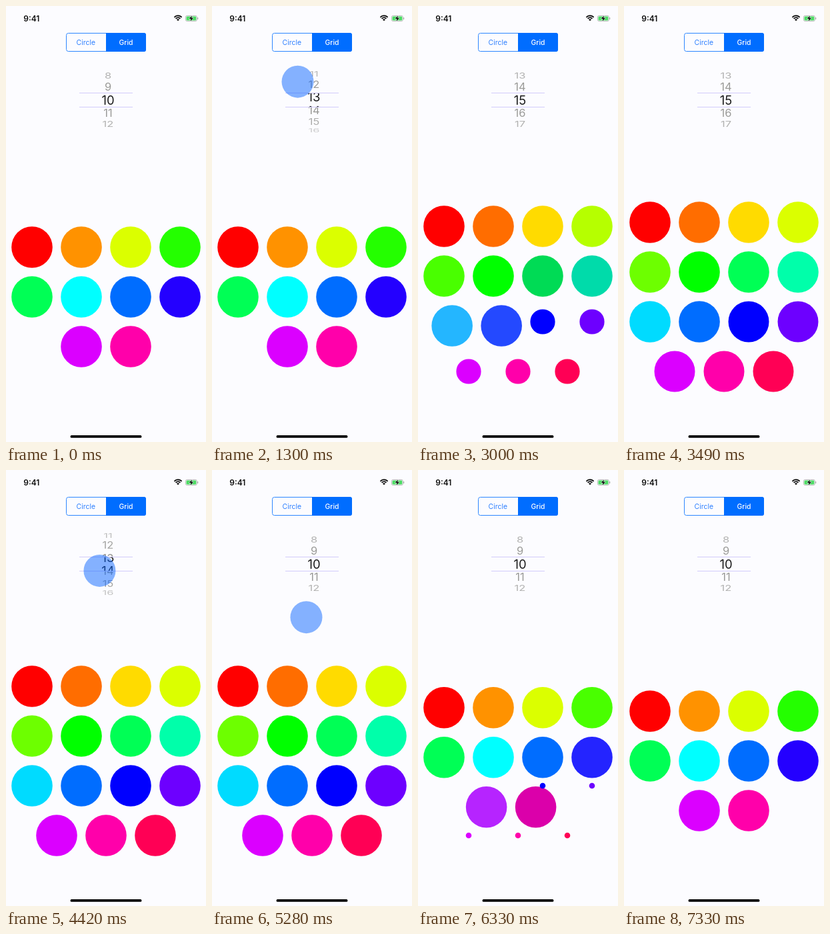
Write an HTML page with a canvas that moves like this. It is 300 by 649 pixels and loops after 7.47 s.

```html
<!DOCTYPE html>
<html lang="en">
<head>
<meta charset="utf-8">
<title>Colour grid picker</title>
<style>
html, body { margin: 0; width: 100%; height: 100%; overflow: hidden; background: #fcfcff; }
canvas { display: block; width: 300px; height: 649px; }
</style>
</head>
<body>
<canvas id="stage"></canvas>
<script>
const LOOP = 7470, BLUE = '#006dff', BG = '#fcfcff';
const FONT = 'Inter, Roboto, sans-serif';
const canvas = document.getElementById('stage');
const g = canvas.getContext('2d');
const dpr = window.devicePixelRatio || 1;
canvas.width = 300 * dpr;
canvas.height = 649 * dpr;
g.scale(dpr, dpr);

const clamp = x => Math.max(0, Math.min(1, x));
const lerp = (a, b, p) => a + (b - a) * p;
const easeOut = p => 1 - (1 - p) ** 2;
const smooth = p => p * p * (3 - 2 * p);
const spring = (rate, ms) => {
  const x = Math.max(0, ms) / 1000 * rate;
  return 1 - (1 + x) * Math.exp(-x);
};

function disc(x, y, r, fill) {
  g.fillStyle = fill;
  g.beginPath();
  g.arc(x, y, r, 0, Math.PI * 2);
  g.fill();
}

function box(x, y, w, h, r, fill) {
  g.fillStyle = fill;
  g.beginPath();
  g.roundRect(x, y, w, h, r);
  g.fill();
}

function label(text, x, y, font, fill) {
  g.font = font + ' ' + FONT;
  g.fillStyle = fill;
  g.textAlign = 'center';
  g.textBaseline = 'alphabetic';
  g.fillText(text, x, y);
}

// Two drags of the wheel; each one settles on a whole number after release.
const drags = [
  { down: 680, start: 740, end: 2206, up: 2260, from: 10, to: 15.2, rest: 15,
    ease: easeOut, y: 177, x: [131, 127] },
  { down: 3780, start: 3840, end: 5440, up: 5460, from: 15, to: 9.85, rest: 10,
    ease: smooth, y: 119, x: [140, 141.5] }
];
const GROW = 2784, SHRINK = 5963;

function wheelValue(t) {
  const d = t < drags[1].start ? drags[0] : drags[1];
  const v = lerp(d.from, d.to, d.ease(clamp((t - d.start) / (d.end - d.start))));
  return lerp(v, d.rest, smooth(clamp((t - d.up) / 400)));
}

function drawTouch(t) {
  for (const d of drags) {
    const alpha = clamp((t - d.down) / 100) * clamp(1 - (t - d.up) / 150);
    if (!alpha) continue;
    const p = d.ease(clamp((t - d.start) / (d.end - d.start)));
    const y = d.y - 20 * (d.to - d.from) * p;
    disc(lerp(...d.x, p), y, 24, `rgba(15,105,255,${0.5 * alpha})`);
  }
}

function drawStatus() {
  label('9:41', 38.3, 22.5, '600 12px', '#111');
  g.strokeStyle = '#000';
  g.lineWidth = 1.7;
  for (const r of [4.6, 7.6]) {
    g.beginPath();
    g.arc(258, 22, r, -Math.PI * 0.76, -Math.PI * 0.24);
    g.stroke();
  }
  g.fillStyle = '#000';
  g.beginPath();
  g.moveTo(258, 22.3);
  g.arc(258, 22, 2.6, -Math.PI * 0.76, -Math.PI * 0.24);
  g.fill();

  g.strokeStyle = '#aaa';
  g.lineWidth = 0.8;
  g.beginPath();
  g.roundRect(269.4, 14.4, 17, 8.2, 2.2);
  g.stroke();
  box(270.5, 15.5, 14.8, 6, 1.2, '#4cdb64');
  box(287.2, 17, 1.1, 3, 0.5, '#aaa');
  g.beginPath();
  [[279, 14.2], [274.6, 19.1], [277.3, 19.1], [276.6, 22.8], [281.2, 17.8], [278.3, 17.8]]
    .forEach(p => g.lineTo(...p));
  g.closePath();
  g.strokeStyle = BG;
  g.lineWidth = 1;
  g.stroke();
  g.fillStyle = '#111';
  g.fill();
}

function drawTabs() {
  g.strokeStyle = '#2f88ff';
  g.lineWidth = 1;
  g.beginPath();
  g.roundRect(90.5, 40.5, 119, 27, 3);
  g.stroke();
  box(150, 40, 60, 28, [0, 3, 3, 0], BLUE);
  label('Circle', 119.8, 57.7, '400 10.4px', '#2f80ff');
  label('Grid', 180, 57.7, '500 10.4px', '#fff');
}

// One pass over the cylinder of numbers, limited to the given strip.
function drawNumbers(v, top, height, size, ink) {
  const step = 22.6 * Math.PI / 180, mid = Math.round(v);
  g.save();
  g.beginPath();
  g.rect(105, top, 90, height);
  g.clip();
  for (let n = mid - 3; n <= mid + 3; n++) {
    const a = (n - v) * step;
    if (Math.abs(a) > 1.15) continue;
    g.save();
    g.translate(153, 139.8 + 50.7 * Math.sin(a));
    g.scale(1, Math.cos(a));
    label(n, 0, size * 0.364, `400 ${size}px`, ink(Math.cos(a)));
    g.restore();
  }
  g.restore();
}

function drawWheel(v) {
  const faded = c => `rgba(40,40,30,${0.5 * c})`;
  drawNumbers(v, 90, 39, 16.5, faded);
  drawNumbers(v, 151, 39, 16.5, faded);
  drawNumbers(v, 129, 22, 18.5, () => '#1c1c1c');
  g.fillStyle = '#d2ccfb';
  g.fillRect(110, 129, 80, 1);
  g.fillRect(110, 150, 80, 1);
}

function hue(i, n) {
  const h = i / n * 6;
  return [0, 4, 2].map(k => 255 * clamp(Math.abs((h + k) % 6 - 3) - 1));
}

// Colours sit on a coarse ladder: eight reds and greens, four blues.
function paint(rgb) {
  const c = rgb.map((x, k) => {
    const levels = k === 2 ? 3 : 7;
    return Math.round(Math.round(x / 255 * levels) / levels * 255);
  });
  return `rgb(${c})`;
}

function slot(i, n) {
  const rows = Math.ceil(n / 4), row = Math.floor(i / 4);
  const count = Math.min(4, n - row * 4);
  return [150 + 74 * (i % 4 - (count - 1) / 2), 433 + 74 * (row - (rows - 1) / 2)];
}

function drawGrid(t) {
  let move = spring(15, t - GROW), size = spring(9.4, t - GROW);
  if (t >= SHRINK) move = size = 1 - spring(9.4, t - SHRINK);
  for (let i = 0; i < 15; i++) {
    const added = i >= 10;
    const r = 30.8 * (added ? size : 1);
    if (r < 0.3) continue;
    const [x1, y1] = slot(i, 15);
    if (added) {
      disc(x1, y1, r, paint(hue(i, 15)));
      continue;
    }
    const [x0, y0] = slot(i, 10), target = hue(i, 15);
    const rgb = hue(i, 10).map((c, k) => lerp(c, target[k], move));
    disc(lerp(x0, x1, move), lerp(y0, y1, move), r, paint(rgb));
  }
}

function draw(t) {
  g.fillStyle = BG;
  g.fillRect(0, 0, 300, 649);
  drawStatus();
  drawTabs();
  drawWheel(wheelValue(t));
  drawGrid(t);
  box(96.5, 639, 107, 3.8, 1.9, '#000');
  drawTouch(t);
}

const began = performance.now();
function tick() {
  draw((performance.now() - began) % LOOP);
  requestAnimationFrame(tick);
}
tick();
</script>
</body>
</html>
```
